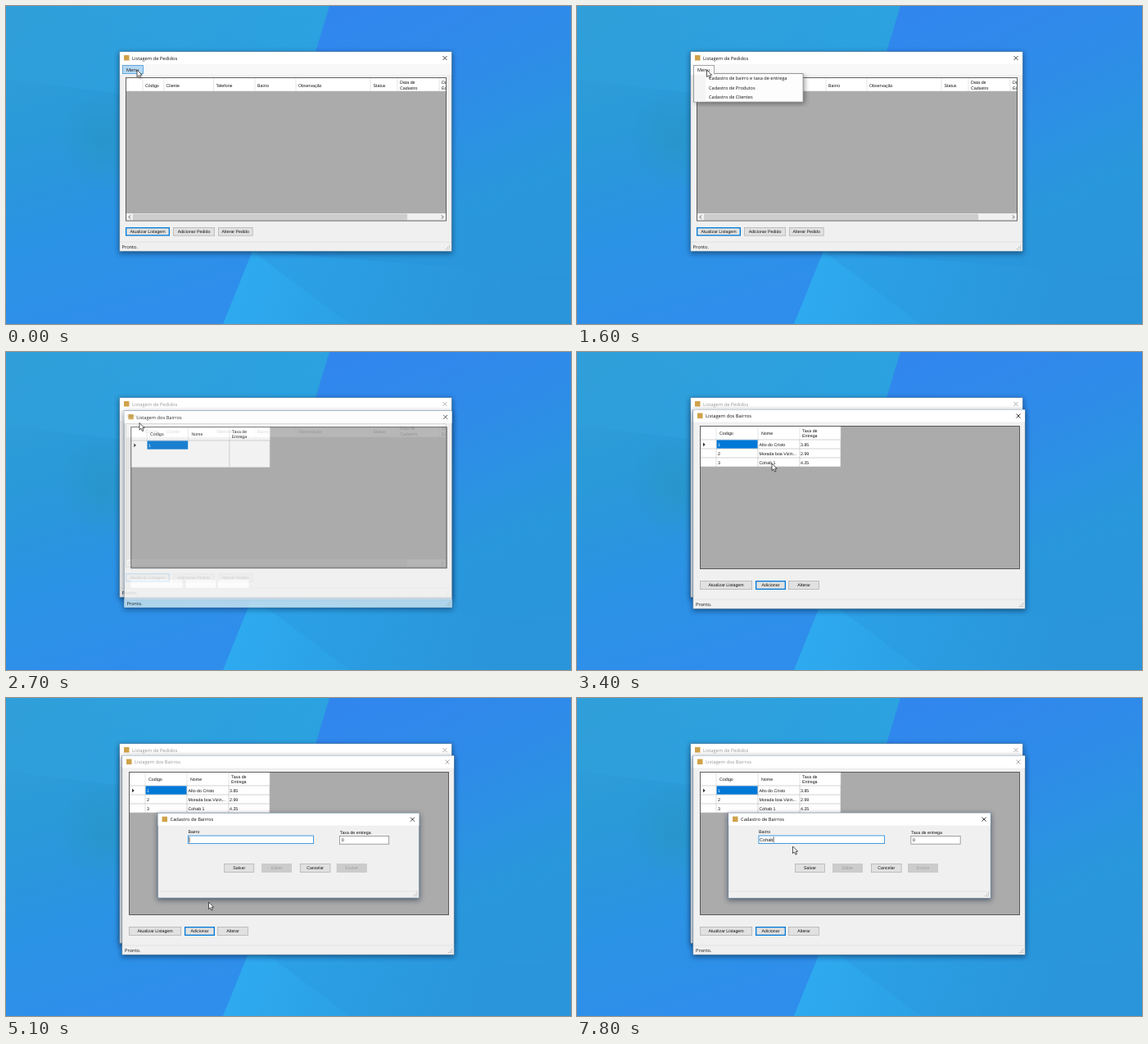
These frames come from a looping animation (690x388 px, 8 s). An HTML page:

```html
<!DOCTYPE html>
<html lang="pt-BR">
<head>
<meta charset="utf-8">
<title>Listagem de Pedidos</title>
<style>
html, body { margin: 0; width: 100%; height: 100%; overflow: hidden; background: #2c98e2; }
svg { display: block; width: 100vw; height: 100vh; }
text { white-space: pre; text-rendering: geometricPrecision; }
.ui { font-family: "Open Sans", "Noto Sans", sans-serif; }
.form { font-family: "Liberation Sans", Arial, sans-serif; }
</style>
</head>
<body>
<svg id="stage" viewBox="0 0 690 388" preserveAspectRatio="none"></svg>
<script>
const LOOP = 8000, STEP = 100;
const BLUE = '#0078d7', FACE = '#f0f0f0', GRID = '#ababab';

const rect = (x, y, w, h, fill, extra = '') =>
  `<rect x="${x}" y="${y}" width="${w}" height="${h}" fill="${fill}" ${extra}/>`;
const frame = (x, y, w, h, fill, stroke, sw = 1, extra = '') =>
  rect(x + sw / 2, y + sw / 2, w - sw, h - sw, fill, `stroke="${stroke}" stroke-width="${sw}" ${extra}`);
const line = (x1, y1, x2, y2, stroke, sw = 0.6) =>
  `<path d="M${x1} ${y1}L${x2} ${y2}" stroke="${stroke}" stroke-width="${sw}"/>`;
const label = (x, y, str, font = 'form', size = 5.3, fill = '#111', extra = '') =>
  `<text x="${x}" y="${y}" class="${font}" font-size="${size}" fill="${fill}" ${extra}>${str}</text>`;
const group = (id, body, extra = '') => `<g id="${id}" ${extra}>${body}</g>`;

function button(x, y, w, h, str, { id = '', primary = false, disabled = false } = {}) {
  const stroke = primary ? BLUE : disabled ? '#c4c4c4' : '#adadad';
  return frame(x, y, w, h, disabled ? '#cccccc' : '#e1e1e1', stroke, primary ? 1.3 : 0.7, id && `id="${id}"`) +
    label(x + w / 2, y + h / 2 + 1.9, str, 'form', 5.25, disabled ? '#9c9c9c' : '#111', 'text-anchor="middle"');
}

function grip(x, y) {
  let dots = '';
  for (let i = 0; i < 3; i++)
    for (let j = 0; j <= i; j++) dots += rect(x - j * 2, y - 4 + i * 2, 1, 1, '#a8a8a8');
  return dots;
}

// Window frame with title bar; the title group carries the active colour.
function chrome(id, x, y, w, h, title) {
  const cx = x + w - 8, cy = y + 7.5;
  return rect(x - 1, y + 1, w + 2, h + 2, '#001830', 'opacity=".5" filter="url(#blur)"') +
    frame(x - 0.5, y - 0.5, w + 1, h + 1, FACE, '#5b7f9c', 0.6) +
    rect(x, y, w, 15, '#fff') +
    rect(x + 5, y + 4, 6.5, 6.5, '#d0a24a') +
    group(id, label(x + 15, y + 9.7, title, 'ui', 5.75, 'currentColor') +
      `<path d="M${cx - 2.5} ${cy - 2.5}l5 5m0-5l-5 5" stroke="currentColor" stroke-width=".8"/>`);
}

function status(x, y, w, bottom) {
  return line(x, y, x + w, y, '#d7d7d7') + grip(x + w - 3, bottom - 3);
}

function wallpaper() {
  const grad = (id, x1, y1, x2, y2, ...stops) =>
    `<linearGradient id="${id}" gradientUnits="userSpaceOnUse" x1="${x1}" y1="${y1}" x2="${x2}" y2="${y2}">` +
    stops.map((c, i) => `<stop offset="${i / (stops.length - 1)}" stop-color="${c}"/>`).join('') + '</linearGradient>';
  return `<defs>
    <filter id="blur" x="-10%" y="-10%" width="120%" height="120%"><feGaussianBlur stdDeviation="3"/></filter>
    <radialGradient id="teal"><stop offset="0" stop-color="#2695c4" stop-opacity=".7"/><stop offset="1" stop-color="#2695c4" stop-opacity="0"/></radialGradient>
    ${grad('left', 60, 0, 170, 388, '#319fda', '#2a9ad8', '#2b93e4', '#2f8dec')}
    ${grad('topLeft', 0, 0, 395, 40, '#2f9fda', '#2ca5e4')}
    ${grad('right', 420, 0, 600, 388, '#3186ee', '#2e8ce8', '#2997dc', '#2a95da')}
    ${grad('low', 290, 300, 600, 388, '#2eaaf0', '#2b9fe4', '#2a94da')}
  </defs>` +
    rect(0, 0, 690, 388, 'url(#left)') +
    '<path d="M0 0H395L378 56L340 130L0 90Z" fill="url(#topLeft)" opacity=".7"/>' +
    '<ellipse cx="118" cy="165" rx="55" ry="62" fill="url(#teal)"/>' +
    '<path d="M395 0H690V388H265L301 299L378 56Z" fill="url(#right)"/>' +
    '<path d="M301 299L420 388H265Z" fill="url(#low)"/>' +
    '<path d="M301 299L690 330V388H420Z" fill="url(#low)" opacity=".6"/>';
}

function ordersWindow() {
  const columns = [[170, 'Código'], [195.5, 'Cliente'], [256.5, 'Telefone'], [307, 'Bairro'],
    [357, 'Observação'], [448.5, 'Status']];
  const body = chrome('ordersTitle', 139, 56, 405, 243, 'Listagem de Pedidos') +
    rect(139, 71, 405, 13, '#f8f8f8') +
    frame(142, 72, 26, 11, '#b5d8f3', '#4a9ad8', 0.8, 'id="menuHot"') +
    label(147, 79.6, 'Menu', 'ui', 5.6) +
    rect(146, 87, 392, 175, GRID) + rect(146, 87, 392, 17, '#fff') +
    [167, 193, 253.5, 304, 354, 445, 478, 529].map(x => line(x, 88, x, 104, '#d4d4d4')).join('') +
    line(146, 104, 538, 104, '#c2c2c2') +
    columns.map(([x, s]) => label(x, 98.5, s)).join('') +
    label(481, 95.2, 'Data de') + label(481, 101.6, 'Cadastro') +
    '<svg x="529" y="87" width="8.5" height="17" viewBox="529 87 8.5 17">' +
    label(532, 95.2, 'Data de') + label(532, 101.6, 'Edição') + '</svg>' +
    rect(146, 253, 392, 9, FACE) + rect(155, 253.5, 335, 8, '#cdcdcd') +
    '<path d="M152 255.5l-2 2l2 2M532 255.5l2 2l-2 2" fill="none" stroke="#444" stroke-width=".9"/>' +
    frame(146, 87, 392, 175.5, 'none', '#505050', 0.9) +
    button(146, 270, 54, 10.5, 'Atualizar Listagem', { primary: true }) +
    button(204, 270, 51, 10.5, 'Adicionar Pedido') +
    button(259, 270, 42.5, 10.5, 'Alterar Pedido') +
    status(139, 288, 405, 299) + label(141.5, 295.8, 'Pronto.', 'ui', 5.7);
  return group('orders', body);
}

function dropdown() {
  const items = ['Cadastro de bairro e taxa de entrega', 'Cadastro de Produtos', 'Cadastro de Clientes'];
  return group('menu',
    rect(145, 85, 133, 34, '#000', 'opacity=".4" filter="url(#blur)"') +
    frame(142, 82, 134.5, 35.5, '#fdfdfd', '#858585', 0.8) +
    rect(143, 83, 14, 33.5, '#f4f4f4') +
    frame(142, 72, 26, 11.5, '#fbfbfb', '#858585', 0.7) + rect(142.8, 82, 24.4, 2, '#fbfbfb') +
    label(147, 79.6, 'Menu', 'ui', 5.6) +
    frame(143.5, 83.3, 132, 10.7, '#b5d8f3', '#4a9ad8', 0.6, 'id="itemHot"') +
    items.map((s, i) => label(161, 90.4 + i * 11.1, s, 'ui', 5.6)).join(''));
}

function districtsWindow() {
  const rows = [['1', 'Alto do Cristo', '3.85'], ['2', 'Morada boa Vizin...', '2.99'], ['3', 'Cohab 1', '4.25']];
  const cols = [172, 222.5, 273];
  const cell = (r, c) => label(cols[c], 114.8 + r * 11, rows[r][c], 'form', 5.3, r + c ? '#111' : '#fff');
  const loaded = rows.map((row, r) => row.map((_, c) => r + c ? cell(r, c) : '').join('')).join('') +
    [118, 129, 140].map(y => line(150, y, 322, y, '#b8b8b8')).join('') +
    line(221, 107, 221, 140, '#b8b8b8') + line(170, 107, 170, 140, '#c8c8c8') +
    button(150, 279, 64, 11, 'Atualizar Listagem') +
    button(218, 279, 37, 11, 'Adicionar', { id: 'addBtn', primary: true }) +
    button(258, 279, 38, 11, 'Alterar');
  const blank = rect(150, 279, 64, 10, '#fff') + rect(218, 279, 37, 10, '#fff') +
    rect(258, 279, 38, 10, '#fff') + rect(142, 303, 405, 10, '#c6e2f0');
  return group('districts', chrome('districtsTitle', 142, 70.5, 405, 242.5, 'Listagem dos Bairros') +
    rect(150, 90, 391, 175, GRID) + rect(150, 90, 172, 50, '#fff') +
    [170, 221, 272, 322].map(x => line(x, 91, x, 107, '#d4d4d4')).join('') +
    line(150, 107, 322, 107, '#b8b8b8') +
    label(174, 101, 'Codigo') + label(225, 101, 'Nome') +
    label(275, 97.6, 'Taxa de') + label(275, 104, 'Entrega') +
    rect(170.4, 107.4, 50.3, 10.4, BLUE) + cell(0, 0) +
    line(272, 107, 272, 140, '#b8b8b8') + line(322, 107, 322, 140, '#b8b8b8') +
    '<path d="M154 110.5l2.7 2.4l-2.7 2.4z" fill="#333"/>' +
    group('loaded', loaded) + group('blank', blank) +
    frame(150, 90, 391, 175, 'none', '#505050', 0.9) +
    status(142, 302, 405, 313) + label(145, 310, 'Pronto.', 'ui', 5.7));
}

function dialog() {
  return group('dialog', chrome('dialogTitle', 185, 140.5, 320, 103.5, 'Cadastro de Bairros') +
    label(222, 165, 'Bairro') + label(408, 165.6, 'Taxa de entrega') +
    frame(221.5, 167.5, 154.5, 10.5, '#fff', '#2f8fdd', 0.9) +
    frame(407.5, 168, 61, 10.5, '#fff', '#7a7a7a', 0.7) + label(410, 175.2, '0') +
    label(223, 174.8, '', 'form', 5.6, '#111', 'id="typed"') +
    rect(223, 169.3, 0.7, 7, '#111', 'id="caret"') +
    button(266, 202, 37, 11, 'Salvar') + button(312, 202, 37, 11, 'Editar', { disabled: true }) +
    button(359, 202, 37.5, 11, 'Cancelar') + button(404, 202, 37, 11, 'Excluir', { disabled: true }) +
    status(185, 236, 320, 244));
}

const pointer = group('pointer',
  '<path d="M0 0V8.6L2 6.8L3.5 10.1L5 9.4L3.6 6.2H6.2Z" fill="#fff" stroke="#111" stroke-width=".7" stroke-linejoin="round"/>');

const stage = document.getElementById('stage');
stage.innerHTML = wallpaper() + ordersWindow() + dropdown() + districtsWindow() + dialog() + pointer;
const el = id => document.getElementById(id);
const show = (id, on) => el(id).setAttribute('visibility', on ? 'inherit' : 'hidden');

// [time, x, y] of the pointer tip
const PATH = [[0, 160, 78], [200, 160, 78], [700, 212, 190], [1400, 158.5, 78], [1800, 158.5, 78],
  [2100, 163, 86], [2300, 163, 86.5], [2800, 163, 86.5], [3400, 238, 136], [3700, 250, 165],
  [4200, 246, 283], [4600, 237.5, 283.5], [4900, 237.5, 283.5], [5000, 240, 276],
  [5100, 247.5, 249], [5500, 263.5, 181], [LOOP, 263.5, 181]];
const TYPING = [[6300, 'C'], [6700, 'Co'], [7500, 'Coh'], [7700, 'Coha'], [7800, 'Cohab']];

function pointerAt(t) {
  const i = Math.max(1, PATH.findIndex(p => p[0] >= t));
  const [t0, x0, y0] = PATH[i - 1], [t1, x1, y1] = PATH[i];
  const k = (t - t0) / (t1 - t0), e = k * k * (3 - 2 * k);
  return [x0 + (x1 - x0) * e, y0 + (y1 - y0) * e];
}

// System window-opening effect: quick fade with a slight zoom.
function openWindow(id, t, start, cx, cy) {
  const n = (t - start) / STEP;
  show(id, n >= 0);
  if (n < 0) return;
  const scale = n > 4 ? 1 : 1 - 0.04 * 0.3 ** n;
  el(id).setAttribute('opacity', n < 1 ? 0.15 : n < 2 ? 0.85 : 1);
  el(id).setAttribute('transform', `translate(${cx} ${cy}) scale(${scale}) translate(${-cx} ${-cy})`);
}

function draw(time) {
  const t = Math.floor(time % LOOP / STEP) * STEP;
  const [x, y] = pointerAt(t);
  el('pointer').setAttribute('transform', `translate(${x} ${y})`);

  const menuOpen = t >= 1600 && t < 2500;
  show('menu', menuOpen);
  show('itemHot', menuOpen && y > 83);
  show('menuHot', t < 1600 && x < 168 && y < 83);

  openWindow('districts', t, 2600, 344.5, 191.5);
  show('loaded', t >= 2800);
  show('blank', t < 2800);
  openWindow('dialog', t, 4900, 345, 192);

  el('ordersTitle').style.color = t < 2500 ? '#111' : '#999';
  el('districtsTitle').style.color = t < 4900 ? '#111' : '#999';
  el('dialogTitle').style.color = '#111';
  const overAdd = x > 218 && x < 255 && y > 279 && y < 290;
  el('addBtn').setAttribute('fill', overAdd ? '#d9ebf8' : '#e1e1e1');

  const last = TYPING.filter(k => k[0] <= t).pop();
  const since = last ? last[0] : 5000;
  const typed = el('typed');
  typed.textContent = last ? last[1] : '';
  el('caret').setAttribute('x', 223.2 + (last ? typed.getComputedTextLength() : 0));
  show('caret', Math.floor((t - since) / 530) % 2 === 0);
  if (t < 4900) show('caret', false);
}

const begin = performance.now();
function tick() {
  draw(performance.now() - begin);
  requestAnimationFrame(tick);
}
tick();
</script>
</body>
</html>
```
